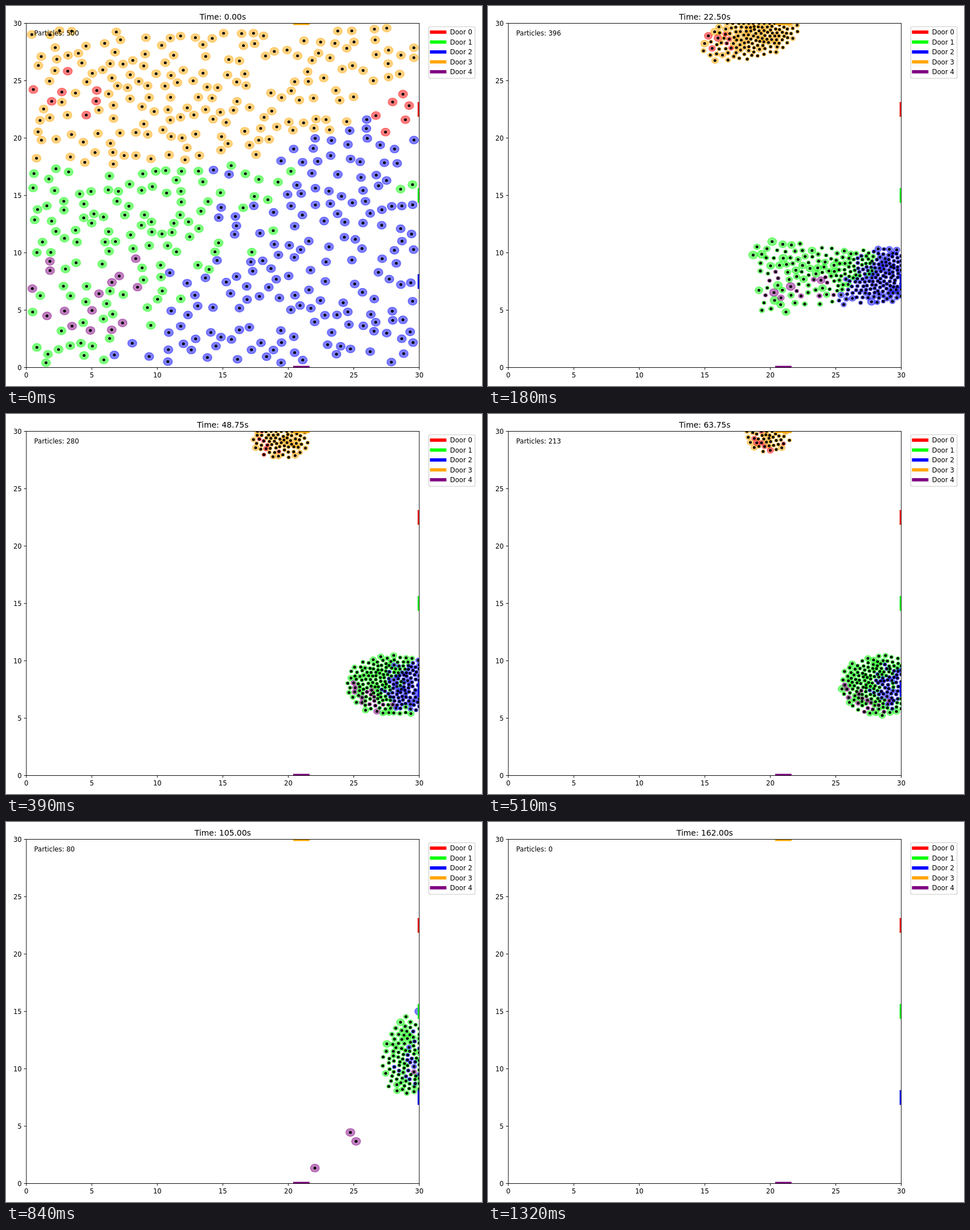
An HTML page with a canvas that plays this animation: 837 by 669 pixels, repeating every 1350 ms.

```html
<!DOCTYPE html>
<html lang="en">
<head>
<meta charset="utf-8">
<title>Door evacuation</title>
<style>
html, body { margin: 0; width: 100%; height: 100%; overflow: hidden; background: #fff; }
canvas { display: block; width: 837px; height: 669px; }
</style>
</head>
<body>
<canvas id="stage"></canvas>
<script>
const W = 837, H = 669, STEP_MS = 30, FRAMES = 45, FRAME_S = 3.75, END_S = 162;
const SIZE = 30, X0 = 35.8, Y0 = 636.5, SX = 23.03, SY = 20.2;
const PEOPLE = 500, R_MIN = 0.15, R_MAX = 0.345, GROW = 0.42, ESCAPE = 0.8, SUB = 60, REACH = 1;
const SWITCH_S = 82, RETURN_S = 152;
const RED = 0, GREEN = 1, BLUE = 2, ORANGE = 3, PURPLE = 4;
const COLORS = ['#ff0000', '#00ff00', '#0000ff', '#ffa500', '#800080'];
const DOORS = [[30, 22.5], [30, 15], [30, 7.5], [21, 30], [21, 0]];

// People still inside: [seconds, count].
const INSIDE = [[0, PEOPLE], [11.25, 445], [33.75, 347], [63.75, 213], [105, 80], [135, 31], [END_S, 0]];

function inside(t) {
  const i = Math.max(1, INSIDE.findIndex(([s]) => t <= s));
  const [t0, a] = INSIDE[i - 1], [t1, b] = INSIDE[i];
  return a + (b - a) * (Math.min(t, t1) - t0) / (t1 - t0);
}

const insideTop = t => 184 * Math.max(0, 1 - t / 87) ** 1.2;

let seed = 20717;
function random() {
  seed = (seed + 0x6D2B79F5) | 0;
  let n = Math.imul(seed ^ (seed >>> 15), 1 | seed);
  n = (n + Math.imul(n ^ (n >>> 7), 61 | n)) ^ n;
  return ((n ^ (n >>> 14)) >>> 0) / 4294967296;
}

// Colour by region: a curved upper border, a slanted blurry one below it.
function pickColor(x, y) {
  if (x > 26 && y > 20.4 && y < 23.2 + (x - 26) * 0.75) return RED;
  if (x > 27.8 && Math.abs(y - 16) < 1.2) return GREEN;
  if (y > 17.6 + 0.021 * Math.max(0, x - 11) ** 2)
    return x < 7 && y > 22 && y < 26 && random() < 0.4 ? RED : ORANGE;
  if (x < 9 && y > 3 && y < 10 && random() < 0.45) return PURPLE;
  return x < Math.min(17.5, 6.5 + 0.85 * y) + (random() + random() - 1) * 5 ? GREEN : BLUE;
}

function pickDoor(x, color) {
  if (color === ORANGE) return 3;
  if (color === RED) return x > 26 ? 0 : 3;
  return color === GREEN && x > 27.8 ? 1 : 2;
}

function scatter() {
  const list = [];
  while (list.length < PEOPLE) {
    const x = 0.4 + 29.2 * random(), y = 0.4 + 29.2 * random();
    if (list.some(p => Math.hypot(p.x - x, p.y - y) < 0.76)) continue;
    const color = pickColor(x, y), first = pickDoor(x, color);
    list.push({ x, y, color, first, door: first, r: R_MAX });
  }
  return list;
}

// The lower crowd first shares door 2, then moves on to door 1 or 4.
function chooseDoor(p, t) {
  if (t < SWITCH_S || p.first === 3) return p.first;
  if (p.color === PURPLE) return 4;
  return p.color === BLUE && t >= RETURN_S ? 2 : 1;
}

const doorDist = p => Math.hypot(p.x - DOORS[p.door][0], p.y - DOORS[p.door][1]);

// Walkers shrink and back off on contact, then regrow and speed up again.
function walk(crowd, dt) {
  crowd.sort((a, b) => a.x - b.x);
  for (const p of crowd) { p.ex = p.ey = 0; p.hit = false; }
  for (let i = 0; i < crowd.length; i++) {
    const a = crowd[i];
    for (let j = i + 1; j < crowd.length; j++) {
      const b = crowd[j], dx = b.x - a.x;
      if (dx > 2 * R_MAX) break;
      const dy = b.y - a.y, reach = a.r + b.r;
      if (dx * dx + dy * dy >= reach * reach) continue;
      const d = Math.hypot(dx, dy) || 1e-6;
      a.hit = b.hit = true;
      a.ex -= dx / d; a.ey -= dy / d;
      b.ex += dx / d; b.ey += dy / d;
    }
  }
  for (const p of crowd) {
    let vx = p.ex, vy = p.ey, speed = ESCAPE;
    if (p.hit) {
      p.r = R_MIN;
    } else {
      p.r = Math.min(R_MAX, p.r + R_MAX * dt / GROW);
      vx = DOORS[p.door][0] - p.x;
      vy = DOORS[p.door][1] - p.y;
      speed = Math.min(((p.r - R_MIN) / (R_MAX - R_MIN)) ** 0.9, doorDist(p) / dt);
    }
    const len = Math.hypot(vx, vy);
    if (len < 1e-6) continue;
    p.x = Math.min(SIZE, Math.max(0, p.x + vx / len * speed * dt));
    p.y = Math.min(SIZE, Math.max(0, p.y + vy / len * speed * dt));
  }
}

// Busy doors let the nearest people out at a set pace; the others are free.
function leave(crowd, t) {
  const main = t < SWITCH_S ? 2 : 1;
  const busy = p => p.door === 3 || p.door === main;
  const others = crowd.filter(p => !busy(p)).length;
  const gone = new Set(crowd.filter(p => !busy(p) && doorDist(p) < 0.6));
  const release = (door, limit) => {
    const group = crowd.filter(p => p.door === door);
    const extra = group.length - Math.round(limit);
    if (extra <= 0) return;
    group.filter(p => doorDist(p) < REACH && !(door === 1 && p.color === BLUE))
      .map(p => [doorDist(p) + (p.color === door ? 0 : 0.5), p])
      .sort((a, b) => a[0] - b[0]).slice(0, extra)
      .forEach(([, p]) => gone.add(p));
  };
  release(3, insideTop(t));
  release(main, inside(t) - insideTop(t) - others);
  return crowd.filter(p => !gone.has(p));
}

function simulate() {
  let crowd = scatter();
  const dt = FRAME_S / SUB, frames = [];
  for (let f = 0; f < FRAMES; f++) {
    frames.push(f < FRAMES - 1 ? crowd.map(({ x, y, r, color }) => ({ x, y, r, color })) : []);
    for (let s = 0; s < SUB; s++) {
      const t = f * FRAME_S + s * dt;
      for (const p of crowd) p.door = chooseDoor(p, t);
      walk(crowd, dt);
      crowd = leave(crowd, t);
    }
  }
  return frames;
}

const canvas = document.getElementById('stage'), ctx = canvas.getContext('2d');
const dpr = window.devicePixelRatio || 1;
canvas.width = Math.round(W * dpr);
canvas.height = Math.round(H * dpr);
ctx.scale(dpr, dpr);

const px = x => X0 + x * SX, py = y => Y0 - y * SY;

function text(str, x, y, align = 'left', size = 11.62) {
  ctx.font = size + 'px "DejaVu Sans", sans-serif';
  ctx.textAlign = align;
  ctx.fillStyle = '#000';
  ctx.fillText(str, x, y);
}

function line(x1, y1, x2, y2, color, width) {
  ctx.strokeStyle = color;
  ctx.lineWidth = width;
  ctx.beginPath();
  ctx.moveTo(x1, y1);
  ctx.lineTo(x2, y2);
  ctx.stroke();
}

function drawCrowd(people) {
  ctx.globalAlpha = 0.5;
  ctx.lineWidth = 1.16;
  for (const p of people) {
    ctx.fillStyle = ctx.strokeStyle = COLORS[p.color];
    ctx.beginPath();
    ctx.ellipse(px(p.x), py(p.y), p.r * SX, p.r * SY, 0, 0, 2 * Math.PI);
    ctx.fill();
    ctx.stroke();
  }
  ctx.globalAlpha = 1;
  ctx.fillStyle = '#000';
  for (const p of people) {
    ctx.beginPath();
    ctx.arc(px(p.x), py(p.y), 2.5, 0, 2 * Math.PI);
    ctx.fill();
  }
}

function drawDoors() {
  DOORS.forEach(([x, y], i) => {
    const cx = px(x), cy = py(y);
    if (x === SIZE) line(cx, cy - 13, cx, cy + 13, COLORS[i], 5.8);
    else line(cx - 14.4, cy, cx + 14.4, cy, COLORS[i], 5.8);
  });
}

function drawAxes() {
  ctx.strokeStyle = '#000';
  ctx.lineWidth = 0.95;
  ctx.strokeRect(X0, py(SIZE), SIZE * SX, SIZE * SY);
  for (let v = 0; v <= SIZE; v += 5) {
    line(px(v), Y0, px(v), Y0 + 4.1, '#000', 0.95);
    line(X0 - 4.1, py(v), X0, py(v), '#000', 0.95);
    text(v, px(v), 653.7, 'center');
    text(v, 27.7, py(v) + 4.3, 'right');
  }
}

function drawLegend() {
  ctx.strokeStyle = '#ccc';
  ctx.lineWidth = 1.1;
  ctx.beginPath();
  ctx.roundRect(743.4, 36.5, 81.4, 90.8, 2.3);
  ctx.stroke();
  COLORS.forEach((color, i) => {
    const y = 46 + i * 17.45;
    line(745.5, y, 774.4, y, color, 5.8);
    text('Door ' + i, 780.8, y + 4.2);
  });
}

const frames = simulate();

function draw(f) {
  const t = Math.min(END_S, f * FRAME_S);
  ctx.fillStyle = '#fff';
  ctx.fillRect(0, 0, W, H);
  ctx.save();
  ctx.beginPath();
  ctx.rect(X0, py(SIZE), SIZE * SX, SIZE * SY);
  ctx.clip();
  drawCrowd(frames[f]);
  drawDoors();
  ctx.restore();
  drawAxes();
  drawLegend();
  text('Time: ' + t.toFixed(2) + 's', 381.2, 23.7, 'center', 13.95);
  text('Particles: ' + Math.round(inside(t)), 49.6, 52);
}

let start, shown = -1;
function tick(now) {
  if (start === undefined) start = now;
  const f = Math.floor(Math.max(0, now - start) / STEP_MS) % FRAMES;
  if (f !== shown) draw(shown = f);
  requestAnimationFrame(tick);
}
draw(0);
requestAnimationFrame(tick);
</script>
</body>
</html>
```
